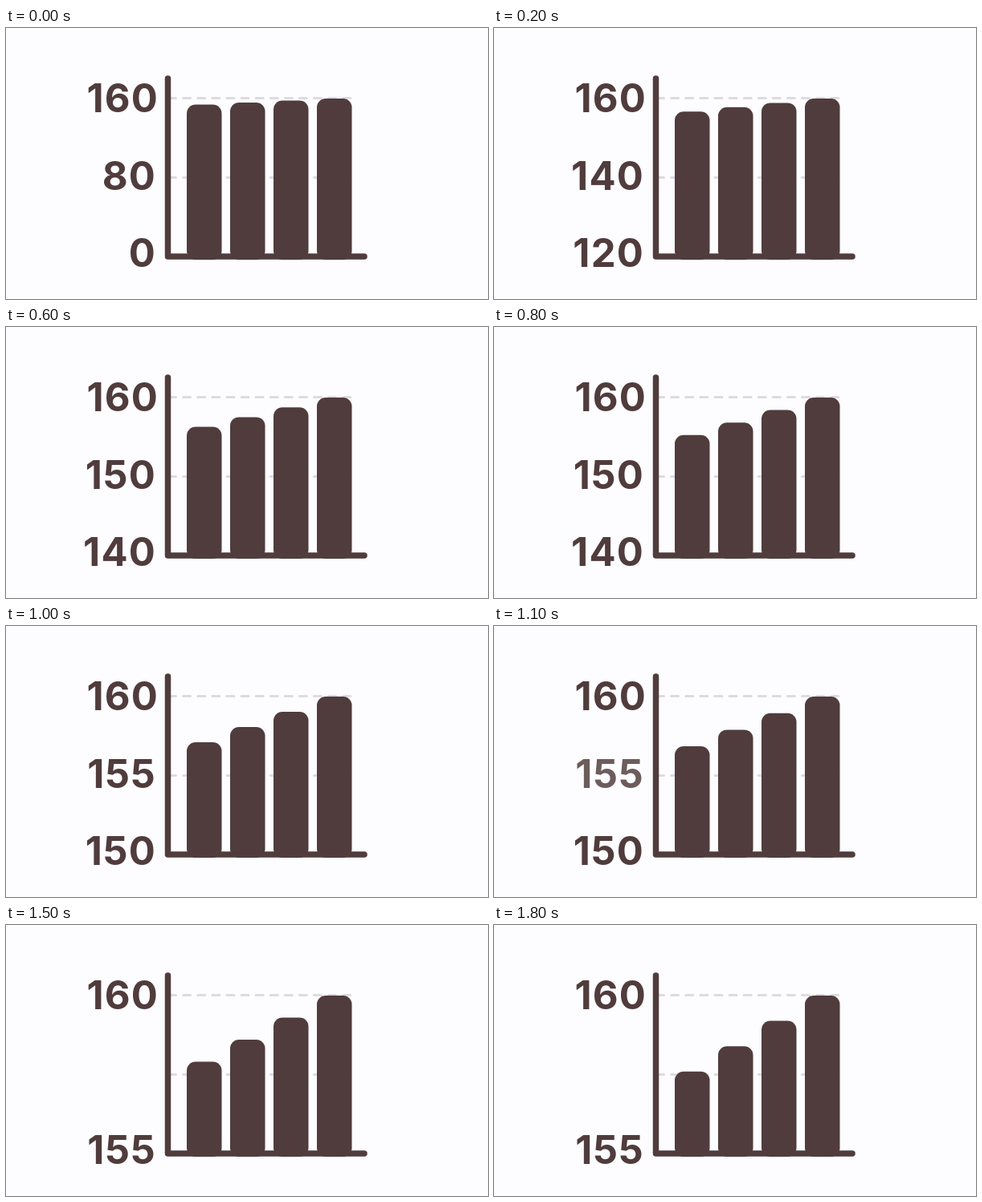
Animation, 600 px wide and 338 px high, one loop 2000 ms. Source, as an HTML page:

```html
<!DOCTYPE html>
<html lang="en">
<head>
<meta charset="utf-8">
<title>Truncated axis</title>
<style>
  html, body { margin: 0; width: 100%; height: 100%; overflow: hidden; background: #fdfcfe; }
  svg { display: block; width: 100%; height: 100%; }
  text { font: 700 49px Inter, sans-serif; letter-spacing: 1.2px; text-anchor: end; }
</style>
</head>
<body>
<svg viewBox="0 0 600 338" fill="#503c3c">
  <g fill="none" stroke="#dddbe0" stroke-width="3" stroke-linecap="round" stroke-dasharray="9 9.1" stroke-dashoffset="2.5">
    <path d="M205 87.5H437"/>
    <path d="M205 186.5H437"/>
  </g>
  <g id="bars"></g>
  <path d="M201.5 63V285H446" fill="none" stroke="#503c3c" stroke-width="7.5" stroke-linecap="round" stroke-linejoin="round"/>
  <text x="190" y="105">160</text>
  <text id="middle" x="187" y="202"></text>
  <text id="bottom" x="187" y="298"></text>
</svg>
<script>
const LOOP = 2000, STEP = 100, LAST = 1800;
const TOP = 88, BASE = 289;

// [time, height lost per bar counted from the right]
const slope = [[0, 2.5], [100, 3.7], [1600, 29.2], [1800, 31.6]];

// [start time, middle label, bottom label]
const scales = [[0, 80, 0], [200, 140, 120], [600, 150, 140], [1000, 155, 150], [1400, '', 155]];

const middle = document.getElementById('middle');
const bottom = document.getElementById('bottom');

const bars = [0, 1, 2, 3].map(i => {
  const bar = document.createElementNS('http://www.w3.org/2000/svg', 'rect');
  bar.setAttribute('x', 225 + 54 * i);
  bar.setAttribute('width', 43.5);
  bar.setAttribute('rx', 11);
  return document.getElementById('bars').appendChild(bar);
});

function interpolate(points, t) {
  const i = Math.max(1, points.findIndex(([time]) => time >= t));
  const [t0, v0] = points[i - 1], [t1, v1] = points[i];
  return v0 + (v1 - v0) * (t - t0) / (t1 - t0);
}

function draw(now) {
  const t = Math.min(LAST, Math.floor(now % LOOP / STEP) * STEP);
  const drop = interpolate(slope, t);
  bars.forEach((bar, i) => {
    const y = TOP + drop * (3 - i);
    bar.setAttribute('y', y);
    bar.setAttribute('height', BASE - y);
  });

  const [, mid, low] = scales.filter(([start]) => start <= t).pop();
  middle.textContent = mid;
  bottom.textContent = low;
  // The middle label fades away before the last scale.
  middle.setAttribute('opacity', t < 1100 ? 1 : Math.max(0, 0.83 - (t - 1100) / 240));
}

const start = performance.now();
function tick() {
  draw(performance.now() - start);
  requestAnimationFrame(tick);
}
tick();
</script>
</body>
</html>
```
